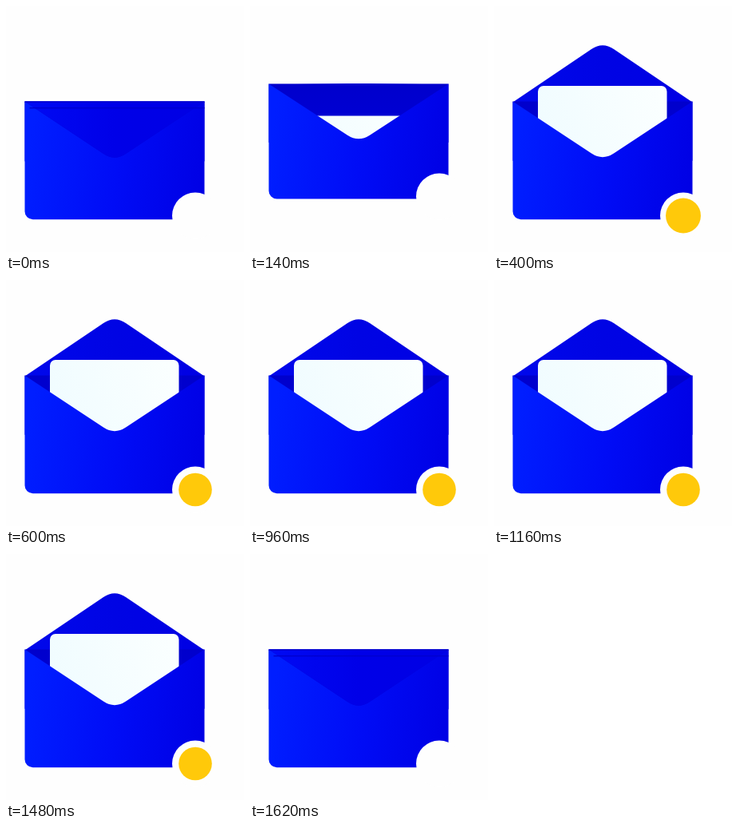
Animation, 298 px wide and 308 px high, one loop 2020 ms. Source, as an HTML page with a canvas:

```html
<!DOCTYPE html>
<html lang="en">
<head>
<meta charset="utf-8">
<title>Opening envelope</title>
<style>
  html, body { margin: 0; width: 100%; height: 100%; overflow: hidden; background: #fefefe; }
  canvas { display: block; width: 298px; height: 308px; }
</style>
</head>
<body>
<canvas id="stage" width="298" height="308"></canvas>
<script>
const ctx = document.getElementById('stage').getContext('2d');
const LOOP = 2020, CLOSE = 1620;
const LEFT = 23.5, RIGHT = 248.5, MID = 136;
const PAPER = '#fefefe';

// Smooth curve through [time, value] points, at rest at both ends.
function track(...keys) {
  const slope = i => i === 0 || i === keys.length - 1 ? 0
    : (keys[i + 1][1] - keys[i - 1][1]) / (keys[i + 1][0] - keys[i - 1][0]);
  return t => {
    if (t <= keys[0][0]) return keys[0][1];
    const i = keys.findIndex(k => k[0] >= t);
    if (i < 0) return keys[keys.length - 1][1];
    const [t0, a] = keys[i - 1], [t1, b] = keys[i];
    const d = t1 - t0, u = (t - t0) / d, v = 1 - u;
    return a * (1 + 2 * u) * v * v + slope(i - 1) * d * u * v * v
      + b * u * u * (3 - 2 * u) - slope(i) * d * u * u * v;
  };
}

const shoulderAt = track([0, 119.4], [140, 97.5], [260, 97.7], [400, 119.5]);
const bottomAt = track([0, 267.3], [140, 241.5], [260, 249.4], [400, 267.3]);
const notchAt = track([0, 262.5], [140, 238.5], [260, 244.5], [400, 262.5]);
const foldAt = track([0, 75], [140, 73.5], [260, 77.5], [400, 74.3]);
const flapAt = track([0, -75], [140, 0], [260, 67.5], [320, 75]);
const letterAt = track([0, 196], [140, 138], [260, 87.3], [400, 100]);
const dotAt = track([290, 0], [410, 23], [520, 20.8]);

function gradient(x0, y0, x1, y1, ...colors) {
  const g = ctx.createLinearGradient(x0, y0, x1, y1);
  colors.forEach((c, i) => g.addColorStop(i / (colors.length - 1), c));
  return g;
}

// Rounded point between the two shoulders, drawn from left to right.
function point(y, height) {
  const near = y + height * 98 / 112;
  ctx.moveTo(LEFT, y);
  ctx.lineTo(MID - 14, near);
  ctx.quadraticCurveTo(MID, y + height, MID + 14, near);
  ctx.lineTo(RIGHT, y);
}

function flap(y, height, color) {
  ctx.beginPath();
  point(y, height);
  ctx.closePath();
  ctx.fillStyle = color;
  ctx.fill();
}

function disc(x, y, r, color) {
  ctx.beginPath();
  ctx.arc(x, y, r, 0, Math.PI * 2);
  ctx.fillStyle = color;
  ctx.fill();
}

function body(y, bottom, fold) {
  ctx.beginPath();
  point(y, fold);
  ctx.lineTo(RIGHT, bottom);
  ctx.arcTo(LEFT, bottom, LEFT, y, 10);
  ctx.closePath();
  ctx.fillStyle = gradient(LEFT, bottom - 50, RIGHT, bottom - 20, '#001eff', '#000cf6', '#0000e4');
  ctx.fill();
}

function draw(time) {
  const t = time >= CLOSE ? 0 : time;
  const y = shoulderAt(t), fold = foldAt(t), lift = flapAt(t);
  const bottom = bottomAt(t), notch = notchAt(t), top = letterAt(t);

  ctx.fillStyle = PAPER;
  ctx.fillRect(0, 0, 298, 308);

  // The pocket lies under the whole front so that no paper shows along the fold.
  if (lift > 0) flap(y + 1, -lift - 1, gradient(LEFT, y, RIGHT, y, '#0008ec', '#0004e4', '#0000e4'));
  ctx.fillStyle = gradient(0, y, 0, y + fold, '#0000cc', '#0000d8');
  ctx.fillRect(LEFT, y, RIGHT - LEFT, fold);

  if (top < y + fold) {
    ctx.beginPath();
    ctx.roundRect(55, top, 161.5, y + fold - top, [7, 7, 0, 0]);
    ctx.fillStyle = gradient(55, top + 60, 216, top, '#f0fcff', '#fbffff');
    ctx.fill();
  }

  body(y, bottom, fold);

  if (lift < 0) {
    flap(y, -lift, gradient(LEFT, y, RIGHT, y, '#000af4', '#0000e8', '#0000e4'));
    ctx.globalAlpha = Math.min(1, -lift / 75);
    ctx.fillStyle = '#0000d0';
    ctx.fillRect(LEFT, y, RIGHT - LEFT, 1.5);
    ctx.fillRect(LEFT + 6, y + 7.5, RIGHT - LEFT - 6, 1.5);
    ctx.globalAlpha = 1;
  }

  disc(237, notch, 29, PAPER);
  const r = dotAt(t);
  if (r > 0) disc(237, 262.5, r, '#ffc90a');
}

function tick() {
  draw(performance.now() % LOOP);
  requestAnimationFrame(tick);
}
tick();
</script>
</body>
</html>
```
